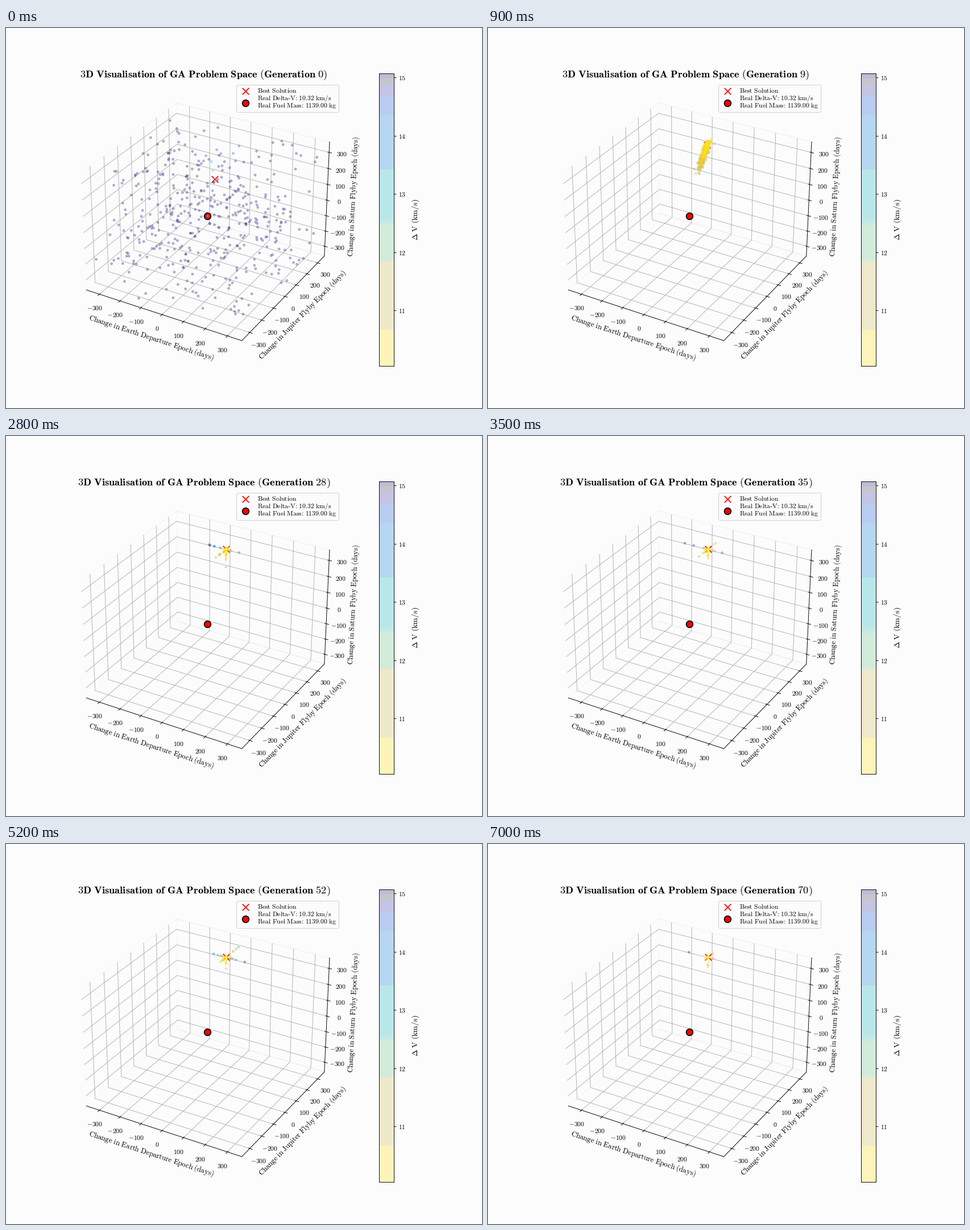
Write a matplotlib script that moves like this. It is 837 px wide and 669 px high and loops after 7100 ms.

```python
import matplotlib.pyplot as plt
import numpy as np
from matplotlib.animation import FuncAnimation
from matplotlib.colors import LinearSegmentedColormap, Normalize

W, H, DPI = 837, 669, 83.7
GENERATIONS = 71
POP = 450
BG = '#fcfcfc'
BOUND = 350
LIMIT = BOUND * 25 / 24
DV_MIN, DV_MAX = 10.04, 15.07

OPTIMUM = np.array([-15, 178, 350])
VALLEY = np.array([-22, -40, -180])

plt.rcParams.update({
    'mathtext.fontset': 'cm',
    'figure.facecolor': BG,
    'axes.facecolor': BG,
    'savefig.facecolor': BG,
})


def roman(text):
    """Set text in upright Computer Modern."""
    text = text.replace(' ', r'\ ').replace(':', r'\text{:}')
    return rf'$\mathrm{{{text}}}$'


def tick_text(value, _):
    return roman(f'{value:.0f}')


def title_text(gen):
    text = f'3D Visualisation of GA Problem Space (Generation {gen})'
    return r'$\mathbf{' + text.replace(' ', r'\ ') + '}$'


def project(points):
    """Perspective view (elevation 30, azimuth -60) in stage pixels."""
    x, y, z = (points * [0.5953, 0.5953, 0.4464] / LIMIT).T
    az, el = np.radians([-60, 30])
    right = -np.sin(az) * x + np.cos(az) * y
    ahead = np.cos(az) * x + np.sin(az) * y
    up = np.cos(el) * z - np.sin(el) * ahead
    depth = 10 - np.cos(el) * ahead - np.sin(el) * z
    scale = 2629.8 / depth
    return np.column_stack([354.4 + right * scale, 331.3 - up * scale])


def delta_v(points):
    """Cost: steep across the valley in x, gentle in y and z."""
    dx, dy, dz = (points - OPTIMUM).T
    along = dz / VALLEY[2]
    ex = abs(dx - VALLEY[0] * along)
    ey = abs(dy - VALLEY[1] * along)
    cost = (DV_MIN + 0.07 * ex + 0.011 * ey + (ey / 90) ** 2
            + 0.002 * abs(dz) + (dz / 230) ** 2)
    near_real = np.linalg.norm(points, axis=1) < 1
    return np.where(near_real, 10.3, np.minimum(cost, DV_MAX))


def best_offset(gen):
    return 1.2 * np.exp(-gen / 3.9)


def best(gen):
    return OPTIMUM + best_offset(gen) * VALLEY


START = np.random.default_rng(7).uniform(-BOUND, BOUND, (POP, 3))
START[0] = best(0)
START[1] = 0


def mutate(points, gen, rng):
    """Shift a few individuals along one axis each."""
    count = 14 + int(28 * np.cos(np.pi * (gen - 28) / 28) ** 2)
    share_x = 0.45 * abs(np.sin(np.pi * (gen - 42) / 20))
    rest = (1 - share_x) / 2
    axis = rng.choice(3, count, p=[share_x, rest, rest])
    size = np.array([45, 38, 45])[axis]
    step = np.clip(rng.normal(0, size), -110, 110)
    step = np.where(axis == 2, -abs(step), step)
    points[np.arange(count), axis] += step


def population(gen):
    if gen == 0:
        return START
    rng = np.random.default_rng(100 + gen)
    width = 0.9 * np.exp(-(gen - 9) / 4.5)
    along = best_offset(gen) + width * (abs(rng.normal(0.4, 0.28, POP)) - 0.1)
    cross = np.array([3, 14, 6]) * np.exp(-(gen - 9) / 5)
    points = OPTIMUM + along[:, None] * VALLEY + rng.normal(0, 1, (POP, 3)) * cross
    if gen > 9:
        mutate(points, gen, rng)
    else:
        stray = rng.random(POP) < 0.5 ** gen
        centre = best(gen)
        points[stray] = centre + (START[stray] - centre) * 0.88 ** gen
    return np.clip(points, -BOUND, BOUND)


# Cost colours, from low to high
stops = [
    (10.04, (249, 240, 18)), (10.5, (252, 226, 30)), (10.8, (240, 202, 55)),
    (11.27, (209, 189, 89)), (12.16, (115, 195, 142)), (12.99, (25, 182, 192)),
    (13.87, (19, 129, 215)), (14.55, (32, 92, 215)), (14.8, (65, 65, 172)),
    (15.07, (50, 40, 130)),
]
cmap = LinearSegmentedColormap.from_list('cost', [
    ((v - DV_MIN) / (DV_MAX - DV_MIN), np.array(c) / 255) for v, c in stops])
norm = Normalize(DV_MIN, DV_MAX)

fig = plt.figure(figsize=(10, 7.993), dpi=DPI)

# Problem space
ax = fig.add_axes([0.125, 0.11, 0.58125, 0.77], projection='3d')
ax.set(xlim=(-LIMIT, LIMIT), ylim=(-LIMIT, LIMIT), zlim=(-LIMIT, LIMIT))
for axis, name in ((ax.xaxis, 'Earth Departure'), (ax.yaxis, 'Jupiter Flyby'),
                   (ax.zaxis, 'Saturn Flyby')):
    axis.pane.set_fill(False)
    axis.set_ticks(range(-300, 301, 100))
    axis.set_major_formatter(tick_text)
    axis.set_label_text(roman(f'Change in {name} Epoch (days)'), fontsize=11)
title = ax.set_title(title_text(0), fontsize=15.8, y=1.0)
title.set_y(1.0)  # 3D axes lower the title by default

# Colour scale
cax = fig.add_axes([0.78375, 0.11, 0.03077, 0.77])
edges = [10.04, 10.67, 11.85, 12.47, 12.56, 13.42, 14.36, 14.68, 14.90, 14.99, 15.07]
bands = ['#fcf4b8', '#efe9cb', '#d3ebdb', '#c5e8e2', '#b8e7ea',
         '#b6d7f1', '#b9ccf1', '#c4c4e4', '#c8c5c9', '#bdbad8']
for low, high, color in zip(edges, edges[1:], bands):
    cax.axhspan(low, high, color=color, lw=0)
cax.set(xlim=(0, 1), ylim=(DV_MIN, 15.066), xticks=[], yticks=range(11, 16))
cax.yaxis.tick_right()
cax.yaxis.set_label_position('right')
cax.yaxis.set_major_formatter(tick_text)
cax.set_ylabel(roman(r'\Delta V (km/s)'), fontsize=12, labelpad=7)

# Markers in stage pixels
stage = fig.add_axes([0, 0, 1, 1], facecolor='none')
stage.set(xlim=(0, W), ylim=(H, 0))
stage.axis('off')
real = stage.scatter(*project(np.zeros((1, 3))).T, s=100, c='red',
                     edgecolors='black', linewidths=1.5, zorder=2)
cross = stage.scatter([0], [0], s=100, c='red', marker='x', linewidths=1.5, zorder=3)
dots = stage.scatter(np.zeros(POP), np.zeros(POP), s=10, c=np.zeros(POP),
                     cmap=cmap, norm=norm, alpha=0.3, linewidths=1, zorder=4)

real_label = '\n'.join([roman('Real Delta\u2010V: 10.32 km/s'),
                        roman('Real Fuel Mass: 1139.00 kg')])
legend = ax.legend([cross, real], [roman('Best Solution'), real_label],
                   loc='upper right', fontsize=10,
                   borderpad=0.35, labelspacing=-0.15)
legend.get_texts()[1].set_linespacing(0.8)


def draw(gen):
    points = population(gen)
    dots.set_offsets(project(points))
    dots.set_array(delta_v(points))
    cross.set_offsets(project(best(gen)[None]))
    title.set_text(title_text(gen))
    return dots, cross, title


anim = FuncAnimation(fig, draw, frames=GENERATIONS, interval=100, repeat=True)
plt.show()
```
